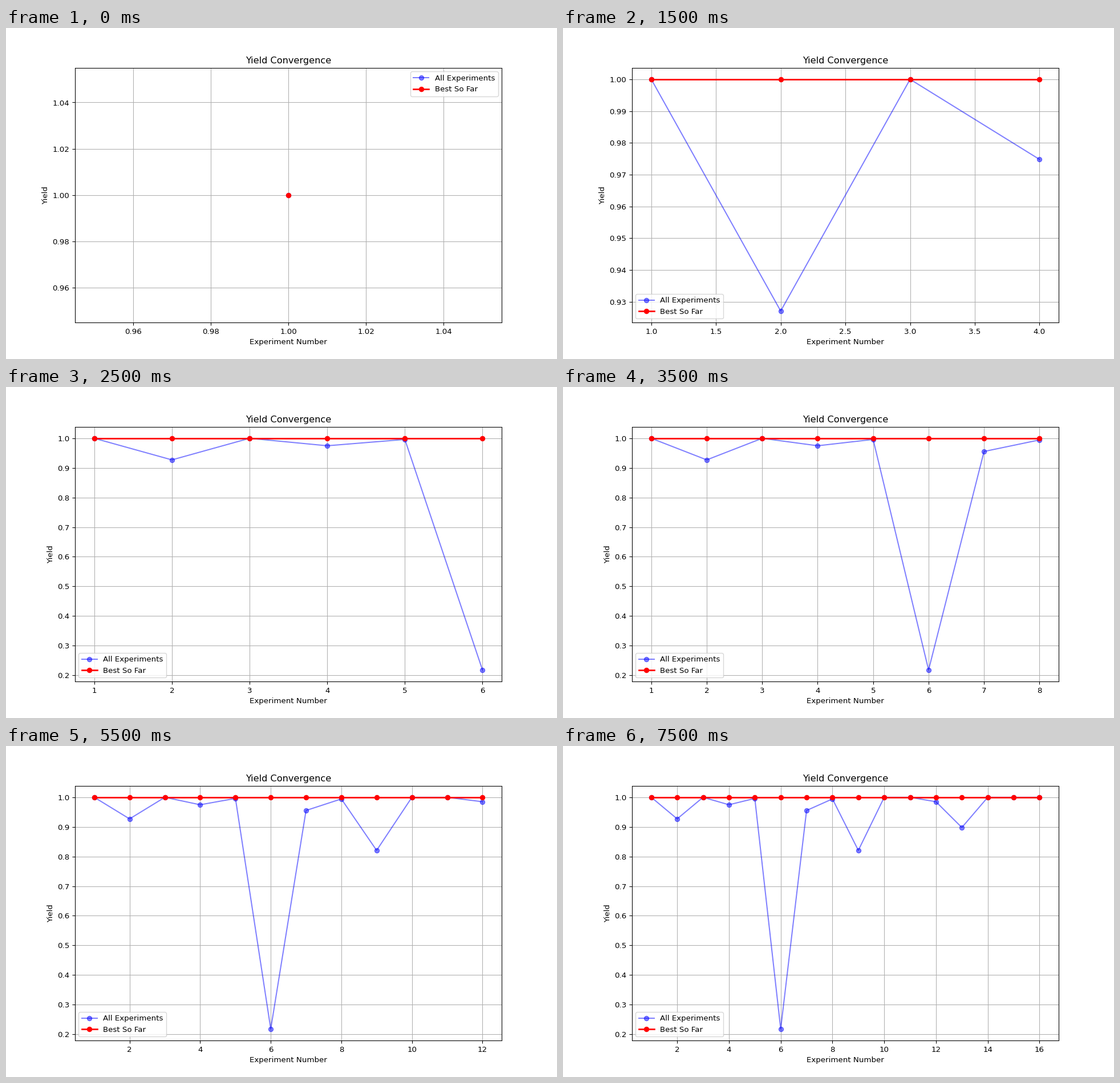
Animation of 966x580 px, one loop 8000 ms. Source, as a matplotlib script:

```python
import matplotlib.pyplot as plt
import numpy as np
from matplotlib.animation import FuncAnimation

WIDTH, HEIGHT, DPI = 966, 580, 96.6
RUNS, STEP_MS = 16, 500

# Every run reaches the full yield of 1 except for these shortfalls.
SHORTFALL = {2: 0.0729, 4: 0.0252, 5: 0.0038, 6: 0.7826, 7: 0.0445,
             8: 0.0055, 9: 0.1793, 12: 0.015, 13: 0.102}

runs = np.arange(1, RUNS + 1)
yields = np.array([1 - SHORTFALL.get(run, 0) for run in runs])
best = np.maximum.accumulate(yields)

# The small margin keeps the pixel size from being rounded down.
size = [(pixels + 0.01) / DPI for pixels in (WIDTH, HEIGHT)]
fig, ax = plt.subplots(figsize=size, dpi=DPI)


def draw(step):
    """Redraw the chart with the first step + 1 experiments."""
    shown = slice(step + 1)
    ax.clear()
    ax.plot(runs[shown], yields[shown], "bo-", alpha=0.5,
            label="All Experiments")
    ax.plot(runs[shown], best[shown], "ro-", linewidth=2,
            label="Best So Far")
    ax.set_title("Yield Convergence")
    ax.set_xlabel("Experiment Number")
    ax.set_ylabel("Yield")
    ax.grid(True)
    ax.legend()


anim = FuncAnimation(fig, draw, frames=RUNS, interval=STEP_MS,
                     repeat=True, repeat_delay=0)

plt.show()
```
